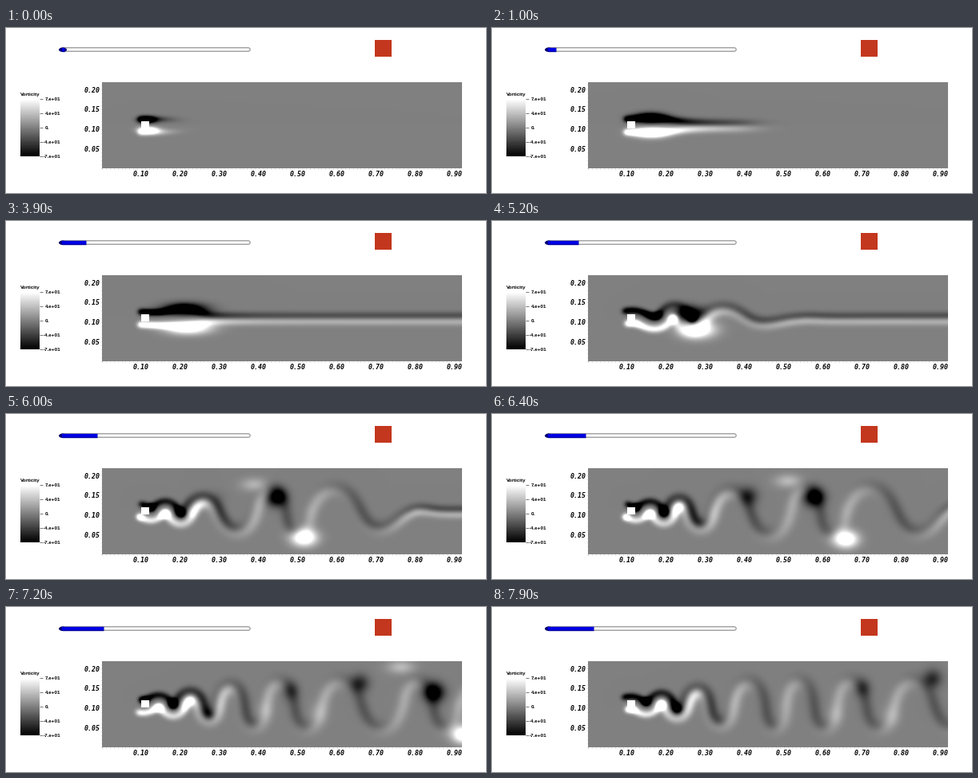
A matplotlib script for the animation above (8 s loop, 600 by 207 pixels).

```python
import numpy as np
import matplotlib.pyplot as plt
from matplotlib.animation import FuncAnimation
from matplotlib.patches import Ellipse, Rectangle

W, H, DPI = 600, 207, 64  # both sizes divide exactly by 64 in binary
FRAMES, STEP = 80, 100
LEFT, RIGHT, TOP, BOTTOM = 120, 570, 68, 176
MID = 122.5

gx = np.arange(LEFT, RIGHT) + 0.5
gy = np.arange(TOP, BOTTOM) + 0.5

# Release times of the shed columns, alternating dark and light.
BIRTHS = np.array([3050, 3400, 3780, 4030, 4450, 4860, 5070, 5310, 5650, 5970,
                   6200, 6430, 6620, 6850, 7020, 7290, 7500, 7730, 7950,
                   8180, 8400, 8640])
PHASES = np.pi * (np.arange(len(BIRTHS)) + 1)

# The starting pair: x, y, width, height and strength against time.
KEYS = [0, 900, 2200, 4500, 5200, 5600, 6000, 6800, 7200, 7900]
DARK_LOBE = [
    [176, 197, 214, 228, 246, 286, 338, 467, 535, 655],
    [115, 113, 112, 110, 116, 108, 104, 104, 107, 107],
    [7, 13, 18, 19, 11, 10, 8.5, 9, 9, 9],
    [2.8, 4.4, 5.3, 5.5, 6.5, 8, 8, 8, 8.5, 8.5],
    [1.6, 1.6, 1.5, 1.4, 1.4, 1.4, 1.35, 1.3, 1.25, 1.2],
]
LIGHT_LOBE = [
    [178, 198, 216, 232, 257, 306, 373, 512, 572, 680],
    [128, 131, 133, 134, 136, 147, 155, 159, 160, 160],
    [8, 14, 18, 20, 15, 13, 11, 10, 10, 10],
    [2.8, 4.4, 5.3, 6, 7.5, 7.5, 7.5, 7.5, 7.5, 7.5],
    [1.6, 1.6, 1.5, 1.4, 1.5, 1.5, 1.5, 1.5, 1.5, 1.5],
]

# Later vortices: release, y when young, y when old, width, height, strength.
CORES = [
    (5640, 108, 90, 8, 8, -0.65),
    (6205, 109, 99, 7, 8, -0.45),
    (5310, 94, 72, 12, 6, 0.45),
    (5980, 128, 139, 8, 9, 0.18),
    (6430, 126, 141, 7, 8, 0.16),
]


def sig(u):
    return 1 / (1 + np.exp(-np.clip(u, -50, 50)))


def drift(age):
    """Stage x of fluid released at x = 225 a given time ago."""
    a = np.maximum(age, 0)
    return 225 + 0.155 * a - 24.5 * (1 - np.exp(-a / 350)) + 0.085 * np.minimum(age, 0)


def splat(x, y, sx, sy, weight):
    x, y, sx, sy, weight = (np.atleast_1d(v) for v in (x, y, sx, sy, weight))
    rows = weight * np.exp(-0.5 * ((gy[:, None] - y) / sy) ** 2)
    cols = np.exp(-0.5 * ((gx - x[:, None]) / sx[:, None]) ** 2)
    return rows @ cols


def sheets(t, lobe_x):
    """The dark and light shear layers on both sides of the wake line."""
    born = np.linspace(t - 2550, t + 690, 520)
    phase = np.interp(born, BIRTHS, PHASES)
    x = drift(t - born)
    onset = 243 + 70 * np.exp(np.clip((4600 - born) / 350, -20, 4))
    swing = sig((x - onset) / (0.12 * onset))
    y = MID + 31 * swing * np.sin(phase)
    xs = x + 3.5 * swing * np.sin(2 * phase)

    dx, dy = -np.gradient(xs), -np.gradient(y)
    step = np.hypot(dx, dy)
    nx, ny = dy / step, -dx / step

    gap = 3.6 + 4.4 * sig((235 - x) / 12)
    bump = np.interp(t, [0, 2200, 5200, 5900], [0, 0.9, 1.3, 0])
    bump = 5 * bump * np.exp(-((x - lobe_x) / 22) ** 2)
    width = 2.8 + 0.7 * sig((x - 230) / 10) + 2.3 * swing
    power = 0.4 - 0.08 * swing + 1.2 * np.exp(-np.maximum(x - 213, 0) / 32)
    power *= sig((185 + 0.139 * t - x) / 12)
    weight = power * step / (2.507 * width)

    total = 0
    for sign, spread in ((-1, 1), (1, 0.5)):
        h = -sign * (gap + spread * bump)
        share = 1 - swing + swing * (0.5 + 0.5 * sign * np.cos(phase)) ** 1.3
        total = total + splat(xs + h * nx, y + h * ny, width, width,
                              sign * weight * share)
    return total


def vorticity(t):
    dark = [np.interp(t, KEYS, row) for row in DARK_LOBE]
    light = [np.interp(t, KEYS, row) for row in LIGHT_LOBE]
    field = sheets(t, dark[0])
    field += splat(*light) - splat(*dark)
    for born, y0, y1, sx, sy, power in CORES:
        age = t - born
        if age > 0:
            x = drift(age)
            y = np.interp(age, [200, 2200], [y0, y1])
            field += splat(x, y, sx, sy, power * sig((x - 285) / 12))
    return np.clip(field, -1, 1)


fig = plt.figure(figsize=(W / DPI, H / DPI), dpi=DPI, facecolor="white")
ax = fig.add_axes([0, 0, 1, 1])
ax.set_axis_off()


def px(n):
    return n * 72 / DPI


def label(x, y, s, size, ha="center", **font):
    ax.text(x, y, s, fontsize=px(size), ha=ha, va="center_baseline",
            weight="bold", color="black", **font)


def line(xs, ys, color, width, cap="butt", z=2):
    return ax.plot(xs, ys, color=color, lw=px(width), solid_capstyle=cap, zorder=z)[0]


flow = ax.imshow(np.zeros((BOTTOM - TOP, RIGHT - LEFT)), cmap="gray", vmin=-1, vmax=1,
                 extent=(LEFT, RIGHT, BOTTOM, TOP), aspect="auto", zorder=1)
ax.add_patch(Rectangle((169, 117), 10, 9, fc="white", lw=0, zorder=3))

# Axis labels and fine ticks
mono = dict(family="DejaVu Sans Mono", style="italic")
for i in range(1, 10):
    label(120 + 49 * i, 182.5, f"{i / 10:.2f}", 8.3, **mono)
for i in range(1, 5):
    label(107.5, 176 - 24.7 * i, f"{i * 0.05:.2f}", 8.3, **mono)
for x in np.arange(LEFT, RIGHT, 4.9):
    line([x, x], [BOTTOM, BOTTOM + 1], "#999999", 0.6)
for y in np.arange(BOTTOM, TOP, -4.93):
    line([LEFT - 1, LEFT], [y, y], "#999999", 0.6)

# Colour scale
ax.imshow(np.linspace(1, -1, 72)[:, None], cmap="gray", vmin=-1, vmax=1,
          extent=(18, 42, 161, 89), aspect="auto", zorder=1)
sans = dict(family="Liberation Sans")
label(18, 83, "Vorticity", 6.2, ha="left", **sans)
for i, s in enumerate(["7.e+01", "4.e+01", "0.", "-4.e+01", "-7.e+01"]):
    y = 89 + 18 * i
    line([42, 46], [y, y], "#444444", 0.7)
    label(47 if s[0] == "-" else 49, y, s, 6.2, ha="left", **sans)

# Time bar
for color, width in (("#8c8c8c", 5.6), ("#cfcfcf", 4), ("#fafafa", 2.2)):
    line([69.5, 302.5], [27.3, 27.3], color, width, cap="round")
ax.add_patch(Ellipse((71, 27.3), 10, 5.4, fc="#000078", lw=0, zorder=3))
bars = [line([70, 73], [27.3, 27.3], c, w, z=4)
        for c, w in (("#0000a0", 5.4), ("#0000e6", 3.8))]

ax.add_patch(Rectangle((461, 15), 21, 21, fc="#c3371e", lw=0))

ax.set_xlim(0, W)
ax.set_ylim(H, 0)


def update(i):
    t = i * STEP
    flow.set_data(vorticity(t))
    for bar in bars:
        bar.set_xdata([70, 73 + 0.0068 * t])
    return [flow, *bars]


anim = FuncAnimation(fig, update, frames=FRAMES, interval=STEP, repeat=True,
                     repeat_delay=0, blit=False)
plt.show()
```
